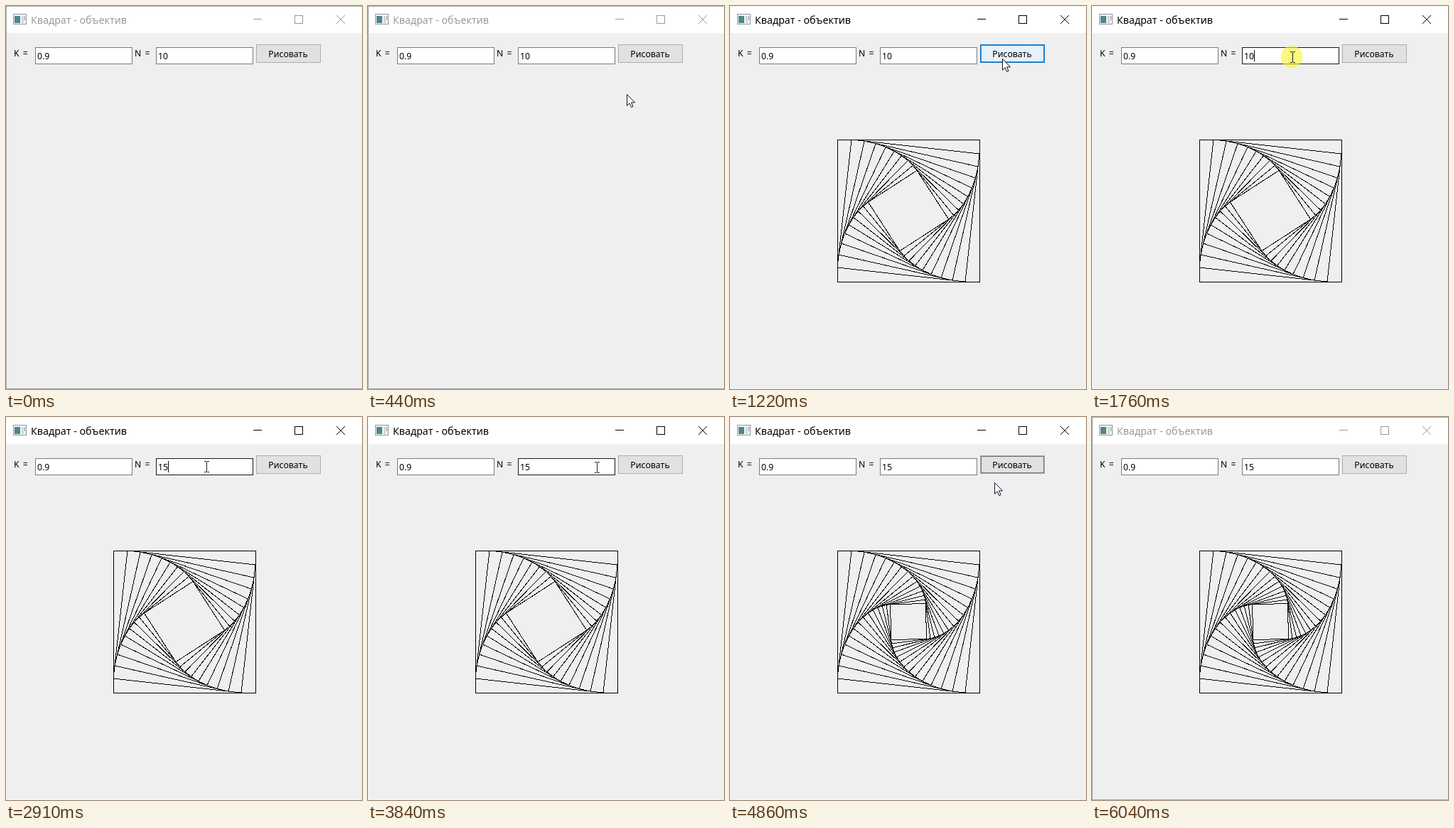
An HTML page for the animation above (6.12 s loop, 501x539 px).

```html
<!DOCTYPE html>
<html lang="ru">
<head>
<meta charset="utf-8">
<title>Квадрат - объектив</title>
<style>
  html, body { margin: 0; width: 100%; height: 100%; overflow: hidden; background: #efefef; }
  svg { display: block; width: 501px; height: 539px; }
  text { font: 12.2px "Noto Sans", "Open Sans", sans-serif; white-space: pre; }
  .title { font-size: 14.2px; }
  .label { word-spacing: 2px; }
  .crisp { shape-rendering: crispEdges; }
</style>
</head>
<body>
<svg viewBox="0 0 501 539" xmlns="http://www.w3.org/2000/svg">
  <rect width="501" height="539" fill="#efefef"/>
  <rect width="501" height="38" fill="#fff"/>
  <path id="frame" class="crisp" d="M501 .5H.5V538.5H501" fill="none"/>

  <g class="crisp">
    <rect x="10.5" y="11.5" width="18" height="14" fill="#f4f6f6" stroke="#8d9798"/>
    <rect x="12" y="14" width="8" height="10" fill="#4f868c"/>
    <rect x="22" y="14" width="3" height="10" fill="#cfd6d6"/>
    <rect x="26" y="14" width="1" height="6" fill="#8d9798"/>
  </g>

  <text id="title" class="title" x="35" y="25">Квадрат - объектив</text>
  <g id="controls" fill="none">
    <path class="crisp" d="M348 18.5h12M406.5 13.5h11v11h-11z"/>
    <path d="M465 13l12 12m0-12l-12 12"/>
  </g>

  <text class="label" x="11" y="71">K =</text>
  <text class="label" x="181" y="71">N =</text>
  <rect class="crisp" x="41.5" y="58.5" width="136" height="23" fill="#fff" stroke="#7a7a7a"/>
  <text x="44" y="75">0.9</text>
  <rect id="field" class="crisp" x="211.5" y="58.5" width="136" height="23" fill="#fff"/>
  <text id="value" x="214" y="75"></text>
  <rect id="caret" class="crisp" y="62" width="1" height="16"/>

  <rect id="button" class="crisp" x="352.5" y="54.5" width="90" height="25"/>
  <path id="dots" class="crisp" d="M353 55.5H442M354 78.5H442M353.5 55V79M441.5 55V79"
        fill="none" stroke="#000" stroke-dasharray="1 1"/>
  <text x="397" y="72" text-anchor="middle">Рисовать</text>

  <g id="squares" class="crisp" fill="none" stroke="#000"></g>

  <g id="pointer">
    <circle id="glow" cx="-1" cy="-.5" r="15.5" fill="#f8f432"/>
    <path id="arrow" d="M.5 .5V16.3L4.1 12.8 6.6 18.5 9 17.5 6.5 11.8H11.5Z"
          fill="#fff" stroke="#112"/>
    <path id="beam" class="crisp" d="M-3 -7.5h3m1 0h3M.5 -7V7M-3 7.5h3m1 0h3"
          fill="none" stroke="#222"/>
  </g>
</svg>
<script>
const LOOP = 6120;
const STEP = 76.5;
const BLINK = 530;
const ui = {};
document.querySelectorAll('[id]').forEach(el => ui[el.id] = el);

// The pointer follows one curve per move, each starting where the last one ended.
const entry = [378, 601];
const moves = [
  { start: 70, end: 670, via: [346, -28], to: [383, 63] },
  { start: 1140, end: 1370, via: [383, 70], to: [384, 91] },
  { start: 1450, end: 1680, via: [300, 96], to: [282, 72] },
  { start: 2070, end: 2071, via: [282, 71], to: [282, 70] },
  { start: 3610, end: 4080, via: [330, 72], to: [370, 69] },
  { start: 4550, end: 4860, via: [370, 86], to: [372, 92] },
  { start: 5030, end: 5330, via: [400, 105], to: [444, 560] }
];
const clicks = [820, 1760, 4250];

const within = (t, a, b) => t >= a && t < b;
const inside = ([x, y], x0, y0, x1, y1) => within(x, x0, x1) && within(y, y0, y1);
const set = (el, attrs) => {
  for (const name in attrs) el.setAttribute(name, attrs[name]);
};
const show = (el, on) => set(el, { visibility: on ? 'visible' : 'hidden' });
const lerp = (a, b, u) => a.map((v, i) => v + (b[i] - v) * u);

function pointerAt(t) {
  const i = moves.filter(m => m.start <= t).length - 1;
  if (i < 0) return entry;
  const { start, end, via, to } = moves[i];
  const from = i ? moves[i - 1].to : entry;
  const last = Math.round((end - start) / STEP);
  const step = Math.floor((t - start) / (end - start) * last + 0.05);
  const u = Math.min(1, (step + 1) / (last + 1));
  return lerp(lerp(from, via, u), lerp(via, to, u), u).map(Math.round);
}

function glowAt(t) {
  const click = clicks.filter(c => c <= t).pop();
  if (click === undefined) return 0;
  const step = Math.floor(Math.max(0, t - click - 20) / 70);
  return 0.62 * Math.max(0, 1 - step / 3);
}

// Every corner moves the share 1 - k along its side to make the next square.
function buildSquares(k, count) {
  const shift = 0.05; // keeps whole coordinates inside their pixel
  let corners = [[151, 188], [351, 188], [351, 388], [151, 388]];
  for (let i = 0; i < count; i++) {
    const shape = document.createElementNS('http://www.w3.org/2000/svg', 'polygon');
    set(shape, { points: corners.join(' '), transform: `translate(${shift} ${shift})` });
    ui.squares.append(shape);
    corners = corners.map((c, j) => lerp(c, corners[(j + 1) % 4], 1 - k));
  }
}

function typedAt(t) {
  if (t < 2760) return '10';
  if (t < 2840) return '';
  return t < 2910 ? '1' : '15';
}

function focusAt(t) {
  if (!within(t, 820, 6040)) return '';
  return within(t, 1760, 4320) ? 'field' : 'button';
}

// Typing restarts the blink.
function caretOn(t) {
  const since = t < 2760 ? 1770 : t < 2910 ? 2760 : 2920;
  return Math.floor(Math.max(0, t - since) / BLINK) % 2 === 0;
}

function buttonLook(t, hover) {
  if (within(t, 820, 910) || within(t, 4320, 4400)) return { fill: '#d9ebf9', stroke: '#005499' };
  return hover ? { fill: '#e5f1fb', stroke: '#0078d7' } : { fill: '#e1e1e1', stroke: '#adadad' };
}

function render(t) {
  const active = within(t, 820, 6040);
  const ink = active ? '#000' : '#999';
  set(ui.frame, { stroke: active ? '#f8f8f8' : '#aaa' });
  set(ui.title, { fill: ink });
  set(ui.controls, { stroke: ink });

  const pos = pointerAt(t);
  const overField = inside(pos, 211, 58, 348, 82);
  const overButton = inside(pos, 352, 54, 443, 80);
  const focus = focusAt(t);

  const typed = typedAt(t);
  ui.value.textContent = typed;
  set(ui.field, { stroke: overField ? '#171717' : focus === 'field' ? '#0078d7' : '#7a7a7a' });
  set(ui.caret, { x: 214 + 7 * typed.length });
  show(ui.caret, focus === 'field' && caretOn(t));

  set(ui.button, buttonLook(t, overButton));
  show(ui.dots, focus === 'button');

  const count = t < 910 ? 0 : t < 4400 ? 10 : 15;
  [...ui.squares.children].forEach((shape, i) => show(shape, i < count));

  set(ui.pointer, { transform: `translate(${pos})` });
  set(ui.glow, { opacity: glowAt(t) });
  show(ui.beam, overField);
  show(ui.arrow, !overField);
}

function tick() {
  render(performance.now() % LOOP);
  requestAnimationFrame(tick);
}

buildSquares(0.9, 15);
tick();
</script>
</body>
</html>
```
